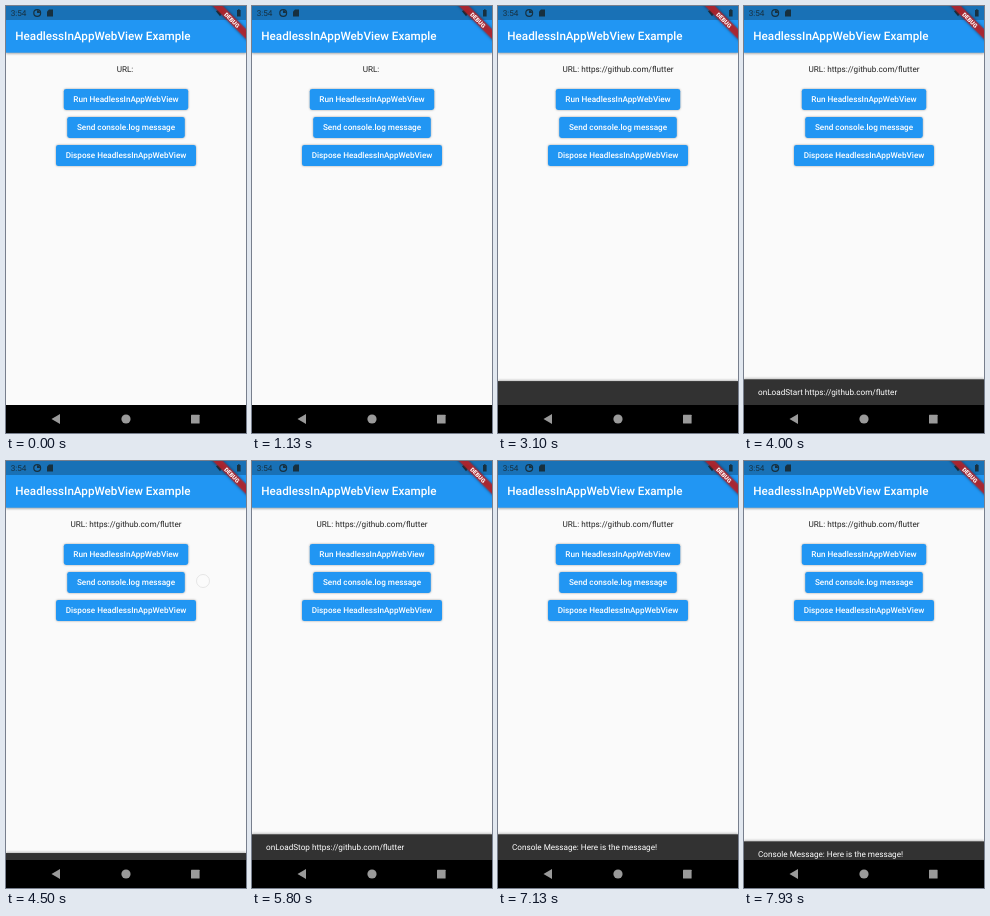
These frames come from a looping animation (240 px wide and 427 px high, 8000 ms). An HTML page:

```html
<!DOCTYPE html>
<html lang="en">
<head>
<meta charset="utf-8">
<title>Headless web view demo</title>
<style>
  html, body { margin: 0; width: 100%; height: 100%; overflow: hidden; background: #fafafa; }
  svg { display: block; width: 100vw; height: 100vh; }
  text { font: 8.17px Roboto, sans-serif; text-rendering: geometricPrecision; white-space: pre; }
  .mid { text-anchor: middle; }
  .bold { font-weight: 500; fill: #fff; }
  #bar { filter: drop-shadow(0 1px 1.2px rgba(0, 0, 0, .35)); }
  #snack { filter: drop-shadow(0 -.5px 1px rgba(0, 0, 0, .25)); }
</style>
</head>
<body>
<svg id="stage" viewBox="0 0 240 427">
  <rect width="240" height="427" fill="#fafafa"/>
  <text id="url" class="mid" y="65.9" fill="#212121"></text>
  <g id="buttons"></g>

  <rect id="bar" width="240" height="46.7" fill="#2196f3"/>
  <rect width="240" height="14" fill="#1971b6"/>
  <text class="bold" x="9.3" y="34.3" style="font-size:11.68px">HeadlessInAppWebView Example</text>

  <g fill="#17303f">
    <text x="4.7" y="10" style="font-size:8.2px">3:54</text>
    <circle cx="31.2" cy="7" r="3.4" fill="none" stroke="#17303f" stroke-width="1.2"/>
    <path d="M31 7V4.2A3 3 0 0 1 34 7Z"/>
    <path d="M43 3.5h4v7h-6v-5z"/>
    <path d="M210 5.2q4-3.4 8 0l-4 5z"/>
    <path d="M231 4h1v-.8h1.6V4h1v6.6H231z"/>
  </g>

  <g transform="translate(240) rotate(45)">
    <rect x="-40" y="16.35" width="80" height="7" fill="#b5242c" fill-opacity=".92"
      style="filter:drop-shadow(0 0 1.5px rgba(0,0,0,.5))"/>
    <text class="bold mid" y="22" style="font-size:5.9px;font-weight:900">DEBUG</text>
  </g>

  <g id="snack">
    <rect width="240" height="27" fill="#323232"/>
    <text id="note" x="14" y="15.7" fill="#fff"></text>
  </g>

  <rect y="399" width="240" height="28" fill="#000"/>
  <g fill="#9a9a9a">
    <path d="M45.5 413l8.5-5v10z"/>
    <circle cx="120" cy="413" r="4.6"/>
    <rect x="185" y="408.8" width="8.6" height="8.6" rx=".5"/>
  </g>

  <circle id="touch" r="6.5" fill="#fff" stroke="#888" stroke-width=".6"/>
</svg>
<script>
const LOOP = 8000, SLIDE = 250, BOTTOM = 399, HEIGHT = 25.7;
const PAGE = 'https://github.com/flutter', URL_AT = 2400;
const $ = id => document.getElementById(id);
const clamp = v => Math.max(0, Math.min(1, v));

const buttons = [
  { label: 'Run HeadlessInAppWebView', w: 124.4, y: 93.4 },
  { label: 'Send console.log message', w: 117.6, y: 121.4 },
  { label: 'Dispose HeadlessInAppWebView', w: 140, y: 149.5 }
];
const taps = [
  { button: 0, x: 132, y: 94, down: 410, up: 560 },
  { x: 197, y: 120, down: 4430, up: 4620 },
  { button: 1, x: 147, y: 126, down: 6330, up: 6620 }
];
// Each note slides in at "start" and begins to leave at "end".
const notes = [
  { text: 'HeadlessInAppWebView created!', start: 1430, end: 2680 },
  { text: 'onLoadStart ' + PAGE, start: 2930, end: 4180 },
  { text: 'onLoadStop ' + PAGE, start: 4435, end: 5800 },
  { text: 'Console Message: Here is the message!', start: 6640, end: 7797 }
];

function bezier(x1, y1, x2, y2) {
  const at = (a, b, s) => 3 * (1 - s) * s * ((1 - s) * a + s * b) + s ** 3;
  return x => {
    let lo = 0, hi = 1;
    for (let i = 0; i < 24; i++) {
      const s = (lo + hi) / 2;
      if (at(x1, x2, s) < x) lo = s; else hi = s;
    }
    return at(y1, y2, lo);
  };
}
const ease = bezier(.25, .1, .25, 1);
const fastOut = bezier(.4, 0, .2, 1);

$('buttons').innerHTML = buttons.map(({ label, w, y }, i) => {
  const box = `<rect x="${120 - w / 2}" y="${y - 10.5}" width="${w}" height="21" rx="2.3" fill="#2196f3"/>`;
  return `<clipPath id="clip${i}">${box}</clipPath><g id="face${i}">${box}</g>
    <g clip-path="url(#clip${i})"><circle id="ink${i}" fill="#fff"/></g>
    <text class="bold mid" x="120" y="${y + 2.8}">${label}</text>`;
}).join('');

function set(el, attrs) {
  for (const key in attrs) el.setAttribute(key, attrs[key]);
}

function drawButton(b, i, t) {
  const tap = taps.find(p => p.button === i);
  let lift = 0, fade = 0;
  if (tap && t >= tap.down) {
    const held = (Math.min(t, tap.up) - tap.down) / 1000;
    const grow = ease(clamp(held + Math.max(0, t - tap.up) / 225));
    const reach = Math.hypot(b.w / 2, 10.5);
    lift = clamp((t - tap.down) / 200) - clamp((t - tap.up) / 200);
    fade = Math.min(clamp((t - tap.down) / 75), 1 - clamp((t - tap.up - 225) / 150));
    set($('ink' + i), {
      cx: tap.x + (120 - tap.x) * grow,
      cy: tap.y + (b.y - tap.y) * grow,
      r: reach * .3 + (reach * .7 + 3) * grow
    });
  }
  set($('ink' + i), { opacity: .22 * fade });
  $('face' + i).style.filter = `drop-shadow(0 ${.8 + 1.8 * lift}px ${.8 + 1.5 * lift}px rgba(0,0,0,.35))`;
}

function drawNote(t) {
  const note = notes.find(n => t >= n.start && t < n.end + SLIDE);
  $('snack').style.display = note ? '' : 'none';
  if (!note) return;
  const enter = clamp((t - note.start) / SLIDE);
  const shown = enter - clamp((t - note.end) / SLIDE);
  set($('snack'), { transform: `translate(0 ${BOTTOM - HEIGHT * fastOut(shown)})` });
  $('note').textContent = note.text;
  set($('note'), { opacity: fastOut(clamp((enter - .72) / .28)) });
}

function drawTouch(t) {
  const tap = taps.find(p => t >= p.down && t < p.up);
  $('touch').style.display = tap ? '' : 'none';
  if (tap) set($('touch'), { cx: tap.x, cy: tap.y, opacity: .3 });
}

function draw(now) {
  const t = now % LOOP, loaded = t >= URL_AT;
  $('url').textContent = loaded ? 'URL: ' + PAGE : 'URL:';
  set($('url'), { x: loaded ? 120 : 119 });
  buttons.forEach((b, i) => drawButton(b, i, t));
  drawNote(t);
  drawTouch(t);
}

const begin = performance.now();
function tick() {
  draw(performance.now() - begin);
  requestAnimationFrame(tick);
}
tick();
</script>
</body>
</html>
```
